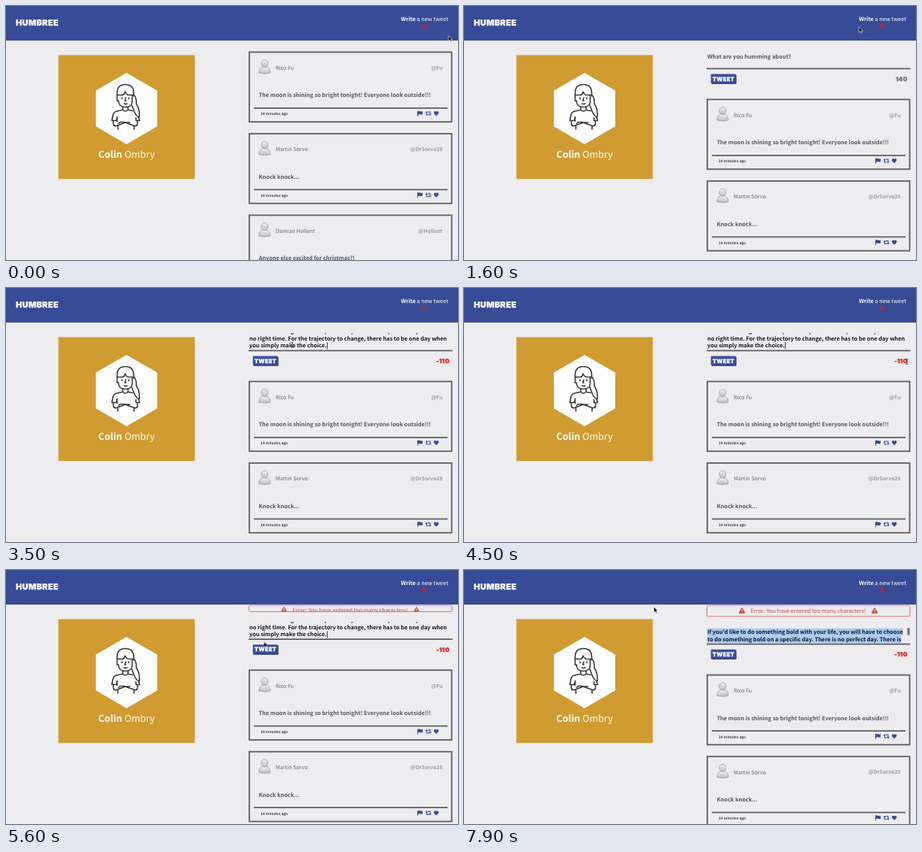
An HTML page that plays this animation: 600x338 px, repeating every 8 s.

```html
<!DOCTYPE html>
<html lang="en">
<head>
<meta charset="utf-8">
<style>
  html, body { margin: 0; height: 100%; overflow: hidden; background: #edecef; }
  svg { display: block; }
  #stage { width: 100vw; height: 100vh; }
  text { font-family: "Noto Sans CJK JP", "Noto Sans CJK SC", "Noto Sans CJK", "Open Sans", sans-serif;
         text-rendering: geometricPrecision; white-space: pre; }
  .b { font-weight: 700; }
  .body { font-size: 7.4px; font-weight: 700; fill: #56555b; }
  .block { font-family: Inter, "DejaVu Sans", sans-serif; font-weight: 900; stroke-width: .25;
           stroke-linejoin: round; letter-spacing: .25px; }
  .line { fill: none; stroke: #39383b; stroke-width: 1.6; stroke-linecap: round; stroke-linejoin: round; }
</style>
</head>
<body>
<svg id="stage" viewBox="0 0 600 338" preserveAspectRatio="none"></svg>
<script>
const LOOP = 8000, LINE = 9.6;
const BLUE = '#384b97', GREY = '#5d5c62', RED = '#d9463f';
const quote = [
  "If you'd like to do something bold with your life, you will have to choose",
  'to do something bold on a specific day. There is no perfect day. There is',
  'no right time. For the trajectory to change, there has to be one day when',
  'you simply make the choice.'
];
const posts = [
  ['Rico Fu', '@Fu', 'The moon is shining so bright tonight! Everyone look outside!!!'],
  ['Martin Sorvo', '@DrSorvo28', 'Knock knock...'],
  ['Damian Hollent', '@Hollent', 'Anyone else excited for christmas?!']
];

const card = ([name, handle, body], i) => `
  <g transform="translate(0 ${i * 108.5})">
    <rect x="323" y=".9" width="268.6" height="92.8" fill="none" stroke="${GREY}" stroke-width="1.8"/>
    <g fill="url(#shine)" stroke="#98979b" stroke-width=".8">
      <path d="M335.8 28.5c0-6 3.5-8.3 7.5-8.3s7.5 2.3 7.5 8.3q-7.5 2.2-15 0z"/>
      <ellipse cx="343.3" cy="16" rx="4.4" ry="5"/>
    </g>
    <text x="358" y="24.4" font-size="7.15" font-weight="300" fill="#67666b">${name}</text>
    <text x="579.5" y="24.2" font-size="6.85" class="b" fill="#9b9a9f" text-anchor="end">${handle}</text>
    <text x="335.5" y="60.8" class="body">${body}</text>
    <path d="M329 75.3H586" stroke="${GREY}" stroke-width="1.7"/>
    <text x="338" y="84.8" font-size="4.85" class="b" fill="#3f3e43">14 minutes ago</text>
    <g fill="${BLUE}">
      <path d="M546 79h1v.6q1.5-.8 3 0t3-.2v4.2q-1.5.8-3 .1t-3 .2v2.3h-1z"/>
      <path d="M558.3 80.5v4h3M563 84.5v-4h-3" fill="none" stroke="${BLUE}" stroke-width="1.1"/>
      <path d="M556.5 81.8l1.8-2.4 1.8 2.4zM561.2 83.2l1.8 2.4 1.8-2.4z"/>
      <path d="M571.2 85.7l-2.7-2.7c-1.3-1.5-.2-3.4 1.2-3.4q1 0 1.5.9.5-.9 1.5-.9c1.4 0 2.5 1.9 1.2 3.4z"/>
    </g>
  </g>`;

const warning = x => `
  <path d="M${x} 3.8l3.9 7h-7.8z" fill="${RED}" stroke="${RED}" stroke-linejoin="round"/>
  <path d="M${x} 5.8v2.5m0 .9v1" stroke="#fff" stroke-width=".9"/>`;

const person = `
  <g class="line">
    <path d="M147.5 126v-10q0-11.5 11-11.5t11 11.5v4"/>
    <path d="M147.5 118.5h7.5q3-1 3-4.5 2 4.500 5 4.500h6.500"/>
    <path d="M147.5 126h2v2q1 6.500 9 6.500t9-6.500v-9"/>
    <path d="M169.500 118q4 4 3.500 12 5 8 4 18-4-1-6.500-7-2-5-3.500-9"/>
    <path d="M155 134v4.500q3.500 3 7 0v-4.500"/>
    <path d="M154 138.500l-7 1.500q-4 1-5 5l-1.500 7.500h6l1-5v6M163 138.500l5 1M176 148l1.500 4.500h-5v-4"/>
    <path d="M142.500 153v4q.5 3 4 2.500l12-4.500h6M174.500 153v4q-.5 3-4 2.500l-14-5h-4q-2 0-3 2M148.500 160v4M170 160v4"/>
    <path d="M154 122v1.500M163 122v1.500M159 122l-1.200 4h1.400M156.800 130q2 1 4 0"/>
  </g>`;

document.getElementById('stage').innerHTML = `
  <defs><linearGradient id="shine" x2="0" y2="1">
    <stop stop-color="#f4f4f5"/><stop offset="1" stop-color="#bdbcc0"/></linearGradient></defs>
  <rect width="600" height="338" fill="#edecef"/>
  <rect x="69.5" y="65.4" width="181.1" height="164.8" fill="#d09b30"/>
  <path d="M160 89l40.700 23.600v47.600L160 184l-40.700-23.800v-47.600z" fill="#fff"/>
  ${person}
  <text x="160" y="202.4" font-size="12.5" fill="#fff" text-anchor="middle"><tspan class="b">Colin</tspan><tspan font-weight="300"> Ombry</tspan></text>

  <g id="cards">${posts.map(card).join('')}</g>

  <svg id="compose" x="0" y="47" width="600" height="0"><g id="form">
    <text id="hint" x="323" y="69.5" class="body">What are you humming about?</text>
    <svg x="318" y="60" width="280" height="22"><g id="scroll">
      ${quote.map((q, i) => `<rect class="sel" y="${2.4 + i * LINE}" height="${LINE + .1}" fill="#a9caf4"/>
        <text class="body typed" x="5" y="${9.9 + i * LINE}" style="fill:#17161a">${q}</text>`).join('')}
      <rect id="caret" y="${2.7 + 3 * LINE}" width=".8" height="9" fill="#111"/>
    </g></svg>
    <rect id="thumb" x="588.5" width="3.2" height="10" rx="1.6" fill="#77767a"/>
    <path d="M322 83.3H592.5" stroke="${GREY}" stroke-width="1.8"/>
    <rect x="328.3" y="91.4" width="33.3" height="12.4" rx="1" fill="#23305f"/>
    <rect x="327.7" y="90.4" width="33" height="12.2" rx="1" fill="#3c50a0"/>
    <text x="344.4" y="99.6" class="block" font-size="7.6" fill="#fff" stroke="#fff" text-anchor="middle">TWEET</text>
    <text id="count" x="588.6" y="99.9" class="block" font-size="8" text-anchor="end"></text>
  </g></svg>

  <svg id="error" x="0" y="46.5" width="600" height="0">
    <text id="errorText" x="457" font-size="7.3" font-weight="300" fill="${RED}" text-anchor="middle">Error: You have entered too many characters!</text>
    <g id="signs">${warning(369)}${warning(545)}</g>
    <rect id="errorBox" x="322.5" y=".5" width="269.5" rx="2" fill="none" stroke="#e0665f"/>
  </svg>

  <rect width="600" height="46" fill="${BLUE}"/>
  <text x="13" y="26.2" class="block" font-size="11" fill="#fff" stroke="#fff">HUMBREE</text>
  <text x="587" y="19.6" font-size="7.4" fill="#fff" text-anchor="end"><tspan class="b">Write</tspan><tspan font-weight="300"> a new tweet</tspan></text>
  <path id="chevron" d="M552-3l3 2.6 3-2.6M552 .2l3 2.6 3-2.6" fill="none" stroke="#b5283c" stroke-width="1.5"/>

  <g id="cursor">
    <path id="arrow" d="M0 0v7.500l1.800-1.600 1.200 2.500 1.300-.6-1.200-2.400h2.300z" fill="#111" stroke="#fff" stroke-width=".6"/>
    <path id="hand" transform="scale(.8)" d="M-.8 0q.8-.9 1.600 0v2.600l3 .8q.8.3.6 1.300l-.8 3.300h-4.100l-2.300-3.200q.2-1.200 2 0z" fill="#111" stroke="#fff" stroke-width=".6"/>
    <path id="beam" d="M-1.500-3.500q1.500 0 1.500 1 0-1 1.500-1M0-2.500v5M-1.500 3.500q1.500 0 1.500-1 0 1 1.500 1" fill="none" stroke="#222" stroke-width=".8"/>
  </g>`;

const $ = id => document.getElementById(id);
const set = (el, attrs) => { for (const k in attrs) el.setAttribute(k, attrs[k]); };
const show = (el, on) => set(el, { visibility: on ? 'inherit' : 'hidden' });
const phase = (t, a, b) => Math.min(1, Math.max(0, (t - a) / (b - a)));
const swing = p => .5 - Math.cos(p * Math.PI) / 2;
const typed = [...document.querySelectorAll('.typed')];
const marks = [...document.querySelectorAll('.sel')];

// time, x, y
const path = [
  [0, 587.2, 39.3], [200, 587.2, 39.3], [850, 555.5, 20], [1400, 555.5, 20], [2200, 344, 72], [3300, 344, 72],
  [4100, 588, 98], [4600, 588, 98], [5250, 343, 95.3], [5700, 343, 95.3], [6100, 343, 92.5], [6550, 343, 92.5],
  [6900, 427, 92.5], [7600, 252, 49], [8000, 252, 49]
];

function moveCursor(t) {
  const i = Math.max(1, path.findIndex(p => p[0] > t));
  const [a, x, y] = path[i - 1], [b, u, v] = path[i];
  const p = swing(phase(t, a, b)), cx = x + (u - x) * p, cy = y + (v - y) * p;
  set($('cursor'), { transform: `translate(${cx} ${cy})` });
  const hand = (t > 700 && t < 1600) || (t > 5150 && t < 5900);
  const beam = !hand && t > 2000 && t < 7300;
  show($('hand'), hand);
  show($('beam'), beam);
  show($('arrow'), !hand && !beam);
}

function draw(t) {
  const open = swing(phase(t, 1125, 1525));
  const err = 15.3 * swing(phase(t, 5380, 5780));
  const top = 60.5 + 63 * open + err;
  set($('cards'), { transform: `translate(0 ${top})` });
  set($('compose'), { height: Math.max(0, top - 61), visibility: open ? 'visible' : 'hidden' });
  set($('form'), { transform: `translate(0 ${err - 47 - 15 * (1 - open)})` });

  const pasted = t >= 3100;
  const tone = pasted ? '#e0261c' : '#77767a';
  show($('hint'), !pasted);
  show($('scroll'), pasted);
  set($('count'), { fill: tone, stroke: tone });
  $('count').textContent = 140 - (pasted ? quote.join(' ').length : 0);

  // Selection grows upward from the end and drags the scroll with it.
  const from = 3.4 * (1 - swing(phase(t, 6900, 7600)));
  const scroll = Math.min(2, from);
  set($('scroll'), { transform: `translate(0 ${-scroll * LINE})` });
  marks.forEach((m, i) => {
    const end = typed[i].getComputedTextLength();
    const x = Math.max(0, from - i) * 264;
    set(m, { x: 5 + x, width: t > 6900 ? Math.max(0, end - x) : 0 });
  });
  set($('caret'), { x: 5.3 + typed[3].getComputedTextLength() });
  show($('caret'), pasted && t < 6950 && t % 1000 >= 450);
  show($('thumb'), scroll < 2);
  set($('thumb'), { y: 61.5 + scroll * 5 });

  set($('error'), { height: err + .5, visibility: err > .1 ? 'visible' : 'hidden' });
  set($('errorBox'), { height: Math.max(0, err - .5) });
  const slip = (err - 15.3) / 7;
  set($('errorText'), { y: 10.2 + slip });
  set($('signs'), { transform: `translate(0 ${slip})` });

  set($('chevron'), { transform: `translate(0 ${27.3 + 1.2 * Math.sin(t * Math.PI / 500)})` });
  moveCursor(t);
}

const start = performance.now();
function tick() {
  draw((performance.now() - start) % LOOP);
  requestAnimationFrame(tick);
}
tick();
</script>
</body>
</html>
```
